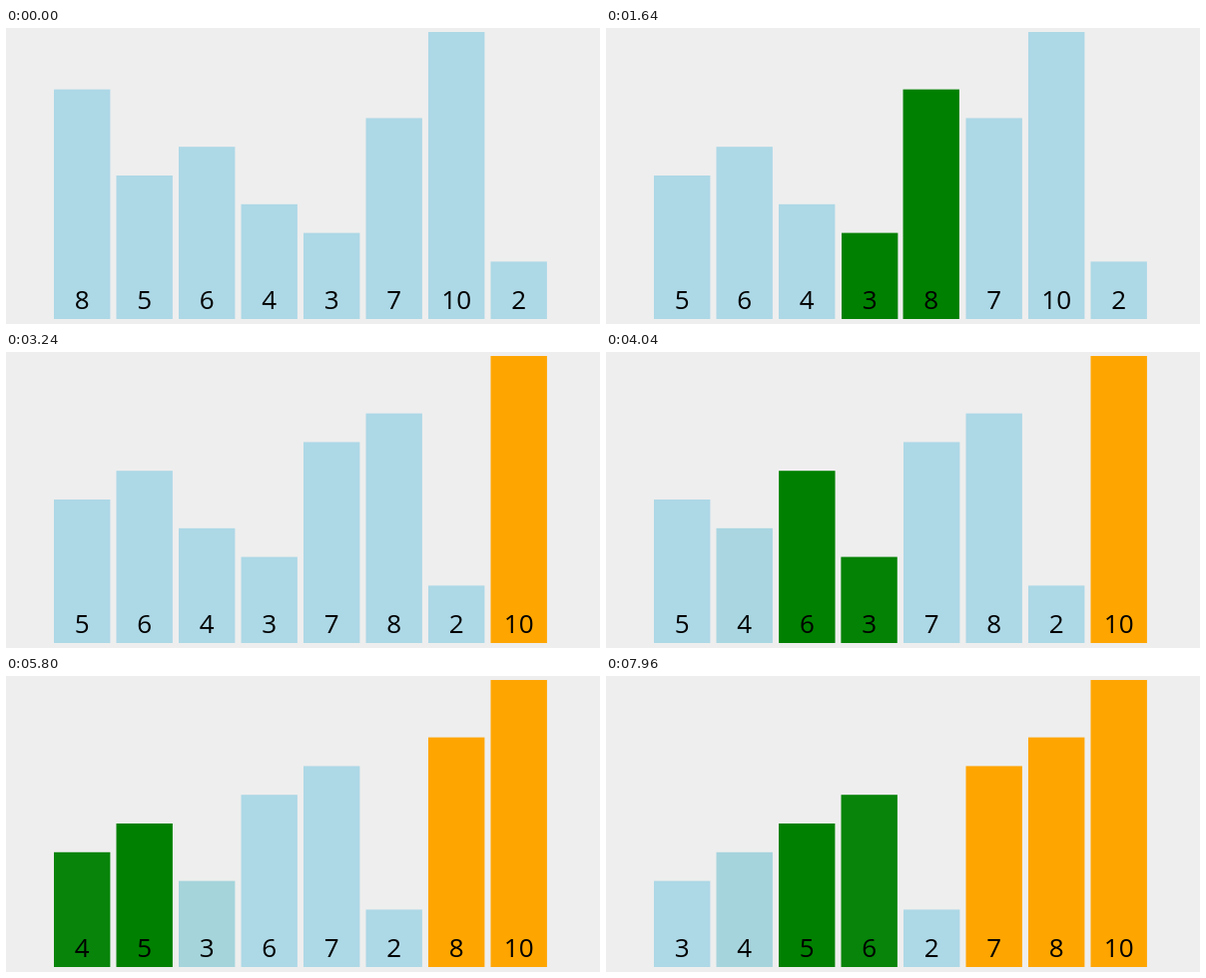
An HTML page with a canvas that plays this animation: 595 px wide and 297 px high, repeating every 8000 ms.

```html
<!DOCTYPE html>
<html lang="en">
<head>
<meta charset="utf-8">
<title>Bubble sort</title>
<style>
  html, body { margin: 0; width: 100%; height: 100%; overflow: hidden; background: #eee; }
  canvas { display: block; }
</style>
</head>
<body>
<canvas id="stage" width="595" height="297"></canvas>
<script>
const ctx = document.getElementById('stage').getContext('2d');
const LOOP = 8000, FADE = 200, SWAP_DELAY = 160, SWAP_STEP = 450;
const LEFT = 48, PITCH = 62.5, BAR = 56.4, FLOOR = 292, UNIT = 28.8;
const IDLE = [173, 216, 230], ACTIVE = [0, 128, 0], SORTED = [255, 165, 0];

const start = [8, 5, 6, 4, 3, 7, 10, 2];
// When each comparison begins, one row per pass.
const passes = [
  [130, 642, 831, 1304, 1777, 2250, 2410],
  [3270, 3430, 3880, 4330, 4490, 4650],
  [5338, 5788, 6225, 6380, 6535],
  [7205, 7655, 7812]
];

// Same curve as the CSS "ease" keyword.
function ease(p) {
  if (p <= 0) return 0;
  if (p >= 1) return 1;
  const bezier = (s, a, b) => 3 * s * (1 - s) ** 2 * a + 3 * s * s * (1 - s) * b + s ** 3;
  let low = 0, high = 1;
  for (let i = 0; i < 20; i++) {
    const mid = (low + high) / 2;
    if (bezier(mid, 0.25, 0.25) < p) low = mid; else high = mid;
  }
  return bezier(low, 0.1, 1);
}

// Value of a chain of transitions, each starting from wherever the last one got to.
function sample(track, t) {
  let value = track[0].to;
  for (let i = 1; i < track.length && track[i].at <= t; i++) {
    const { at, to } = track[i];
    const end = i + 1 < track.length ? Math.min(t, track[i + 1].at) : t;
    const p = ease((end - at) / FADE);
    value = value.map((v, k) => v + (to[k] - v) * p);
  }
  return value;
}

function change(track, at, to) {
  if (track[track.length - 1].to !== to) track.push({ at, to });
}

function buildBars() {
  const bars = start.map((value, i) => ({
    value,
    slot: [{ at: 0, to: [i] }],
    color: [{ at: 0, to: IDLE }]
  }));
  const order = bars.slice();
  passes.forEach((times, pass) => {
    const last = order.length - 1 - pass;
    times.forEach((at, j) => {
      const a = order[j], b = order[j + 1];
      for (let i = 0; i <= last; i++) {
        change(order[i].color, at, i === j || i === j + 1 ? ACTIVE : IDLE);
      }
      if (a.value > b.value) {
        a.slot.push({ at: at + SWAP_DELAY, to: [j + 1] });
        b.slot.push({ at: at + SWAP_DELAY, to: [j] });
        order[j] = b;
        order[j + 1] = a;
      }
      if (j + 1 === last) {
        change(order[j].color, at + SWAP_STEP, IDLE);
        change(order[last].color, at + SWAP_STEP, SORTED);
      }
    });
  });
  // Smaller bars pass in front of taller ones.
  return bars.sort((a, b) => b.value - a.value);
}

const bars = buildBars();

function draw(t) {
  ctx.fillStyle = '#eee';
  ctx.fillRect(0, 0, 595, 297);
  ctx.font = '26px "Open Sans", "Noto Sans", sans-serif';
  ctx.textAlign = 'center';
  ctx.textBaseline = 'alphabetic';
  for (const bar of bars) {
    const x = LEFT + PITCH * sample(bar.slot, t)[0];
    const height = UNIT * bar.value;
    ctx.fillStyle = `rgb(${sample(bar.color, t).map(Math.round).join(',')})`;
    ctx.fillRect(x, FLOOR - height, BAR, height);
    ctx.fillStyle = '#000';
    ctx.fillText(bar.value, x + BAR / 2, 282);
  }
}

function frame() {
  draw(performance.now() % LOOP);
  requestAnimationFrame(frame);
}
frame();
</script>
</body>
</html>
```
